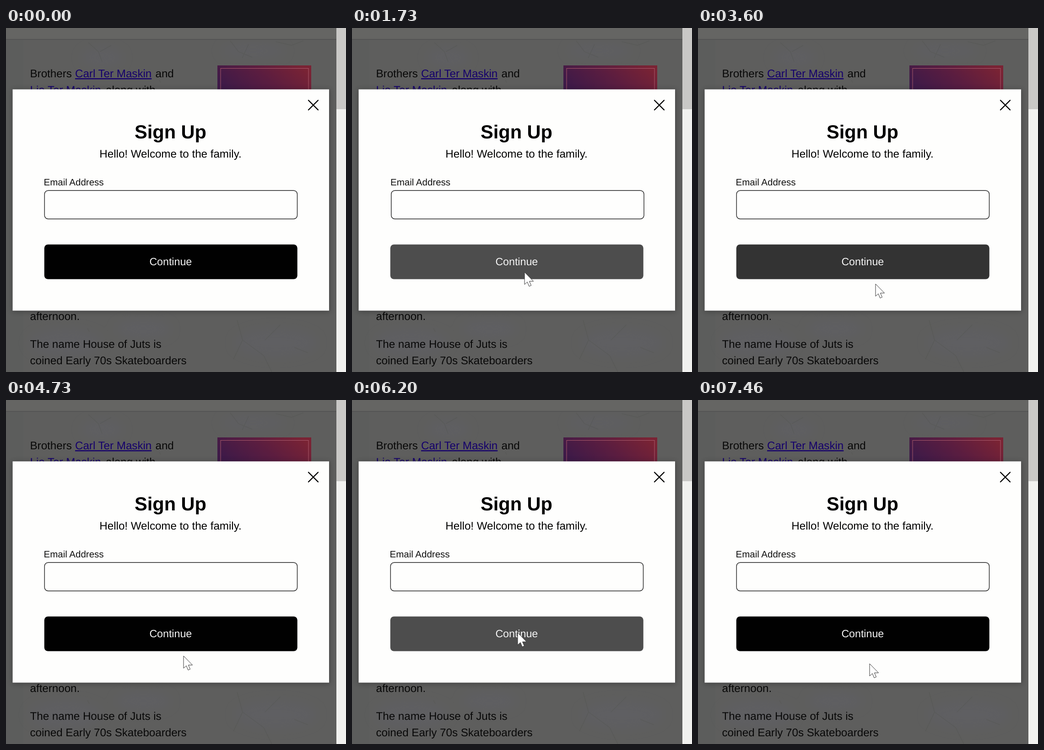
An HTML page that plays this animation: 743 px wide and 754 px high, repeating every 7530 ms.

```html
<!DOCTYPE html>
<html lang="en">
<head>
<meta charset="utf-8">
<title>Sign Up</title>
<style>
  html, body { margin: 0; width: 100%; height: 100%; overflow: hidden; background: #5e5e5d; }
  svg { display: block; width: 743px; height: 754px; font: 24.15px "Liberation Sans", Arial, sans-serif; text-rendering: geometricPrecision; }
  .page { fill: #080808; }
  .link { fill: #15006b; text-decoration: underline; }
  .mid { text-anchor: middle; }
  .vein { fill: none; stroke: #51534f; stroke-width: 1.5; opacity: .35; }
</style>
</head>
<body>
<svg viewBox="0 0 743 754">
  <defs>
    <linearGradient id="poster" x1=".15" y1=".5" x2=".9" y2="0">
      <stop stop-color="#3e1a48"/><stop offset=".5" stop-color="#5b1d40"/><stop offset="1" stop-color="#7a2334"/>
    </linearGradient>
    <filter id="soft" x="-50%" y="-50%" width="200%" height="200%"><feGaussianBlur stdDeviation="12"/></filter>
    <filter id="shade" x="-10%" y="-10%" width="120%" height="120%"><feGaussianBlur stdDeviation="6"/></filter>
  </defs>

  <!-- dimmed page -->
  <rect width="722" height="754" fill="#5e5e5d"/>
  <g filter="url(#soft)" fill="#606069" opacity=".4">
    <ellipse cx="210" cy="65" rx="45" ry="22"/>
    <ellipse cx="540" cy="50" rx="70" ry="16"/>
    <ellipse cx="130" cy="690" rx="80" ry="30"/>
    <ellipse cx="300" cy="660" rx="60" ry="20"/>
    <ellipse cx="590" cy="690" rx="90" ry="30"/>
  </g>
  <rect y="25" width="38" height="729" fill="#565a59" opacity=".25"/>
  <g class="vein">
    <path d="M180 32l22 20 8 22M205 52l25-14M490 28l18 24 30 12M530 36l-14 30M590 30l34 8 26-10"/>
    <path d="M505 640l12 44-20 42M517 684l46 34 18 36M600 650l-34 34M630 700l30 12M178 658l4 8M335 114l3 6"/>
  </g>
  <rect width="722" height="24" fill="#656563"/>
  <rect y="24" width="722" height="2" fill="#545454"/>
  <g class="page">
    <text x="52.5" y="108">Brothers</text>
    <text x="151" y="108" class="link">Carl Ter Maskin</text>
    <text x="326.5" y="108">and</text>
    <text x="52.5" y="144" class="link">Lio Ter Maskin</text>
    <text x="218" y="144">along with</text>
    <text x="52.5" y="640">afternoon.</text>
    <text x="52.5" y="701">The name House of Juts is</text>
    <text x="52.5" y="737">coined Early 70s Skateboarders</text>
  </g>
  <rect x="462" y="82" width="205" height="120" fill="url(#poster)"/>
  <rect x="469" y="88.5" width="192" height="110" fill="none" stroke="#a85a6b"/>

  <!-- scrollbar -->
  <rect x="722" width="21" height="754" fill="#f1f1ef"/>
  <rect x="722" width="21" height="178" fill="#c9c8c6"/>

  <!-- dialog -->
  <rect x="14" y="135" width="693" height="487" opacity=".28" filter="url(#shade)"/>
  <rect x="14.5" y="134.5" width="691.5" height="485" fill="#fefefd"/>
  <path d="M661 158.5l21 21m0-21l-21 21" stroke="#000" stroke-width="2.4" stroke-linecap="round"/>
  <text x="359.5" y="241.5" class="mid" font-size="41.5" font-weight="bold">Sign Up</text>
  <text x="359.5" y="284" class="mid">Hello! Welcome to the family.</text>
  <g id="field">
    <text x="82.5" y="345" font-size="20.5" fill="#111">Email Address</text>
    <rect x="84.2" y="356.2" width="552.3" height="62.3" rx="8" fill="none" stroke="#222" stroke-width="1.4"/>
  </g>
  <rect id="button" x="83.7" y="474.5" width="553" height="76" rx="8"/>
  <text x="359.8" y="520" class="mid" font-size="23.2" fill="#f6f6f6">Continue</text>
  <path id="cursor" d="M0 0V27L6 21.5L10 31L14.5 29L10.5 20H19.5Z" fill="#fff" stroke="#333" stroke-linejoin="round"/>
</svg>
<script>
const LOOP = 7530, FADE = 500;
const [field, button, cursor] = ['field', 'button', 'cursor'].map(id => document.getElementById(id));

// pointer stops: time, x, y
const path = [
  [60, 374, 588], [290, 369, 550], [560, 362, 510], [1400, 362, 510],
  [1730, 377, 535], [1850, 384, 556], [2000, 386, 570], [2400, 386, 564],
  [2440, 383, 549], [2750, 374, 522], [3300, 374, 522], [3490, 386, 551],
  [3600, 388, 561], [4800, 388, 561], [4960, 379, 549], [5260, 362, 510],
  [6350, 362, 510], [6605, 371, 551], [6730, 373, 563], [7000, 375, 578], [LOOP, 375, 578]
];
// moments the pointer enters and leaves the button, in turn
const crossings = [290, 1770, 2440, 3490, 4960, 6605];

// CSS "ease", solved by bisection
function ease(p) {
  if (p >= 1) return 1;
  let lo = 0, hi = 1, s;
  for (let i = 0; i < 20; i++) {
    s = (lo + hi) / 2;
    if (.75 * s * (1 - s) + s ** 3 < p) lo = s; else hi = s;
  }
  return .3 * s * (1 - s) ** 2 + 3 * s * s * (1 - s) + s ** 3;
}

function pointerAt(t) {
  const i = path.findIndex(p => p[0] > t);
  const [a, b] = [path[i - 1], path[i]];
  const k = (t - a[0]) / (b[0] - a[0]);
  return [1, 2].map(j => a[j] + (b[j] - a[j]) * k);
}

function hoverAt(t) {
  const past = crossings.filter(c => c <= t);
  if (!past.length) return 0;
  const e = ease((t - past.at(-1)) / FADE);
  return past.length % 2 ? e : 1 - e;
}

function draw(t) {
  const shown = t >= path[0][0];
  cursor.setAttribute('visibility', shown ? 'visible' : 'hidden');
  if (shown) cursor.setAttribute('transform', `translate(${pointerAt(t)})`);
  const v = Math.round(1 + 76 * hoverAt(t));
  button.setAttribute('fill', `rgb(${v},${v},${v})`);
  field.setAttribute('transform', `translate(${t >= 1400 && t < 2200 ? 1.5 : 0})`);
}

const start = performance.now();
function tick() {
  draw((performance.now() - start) % LOOP);
  requestAnimationFrame(tick);
}
tick();
</script>
</body>
</html>
```
